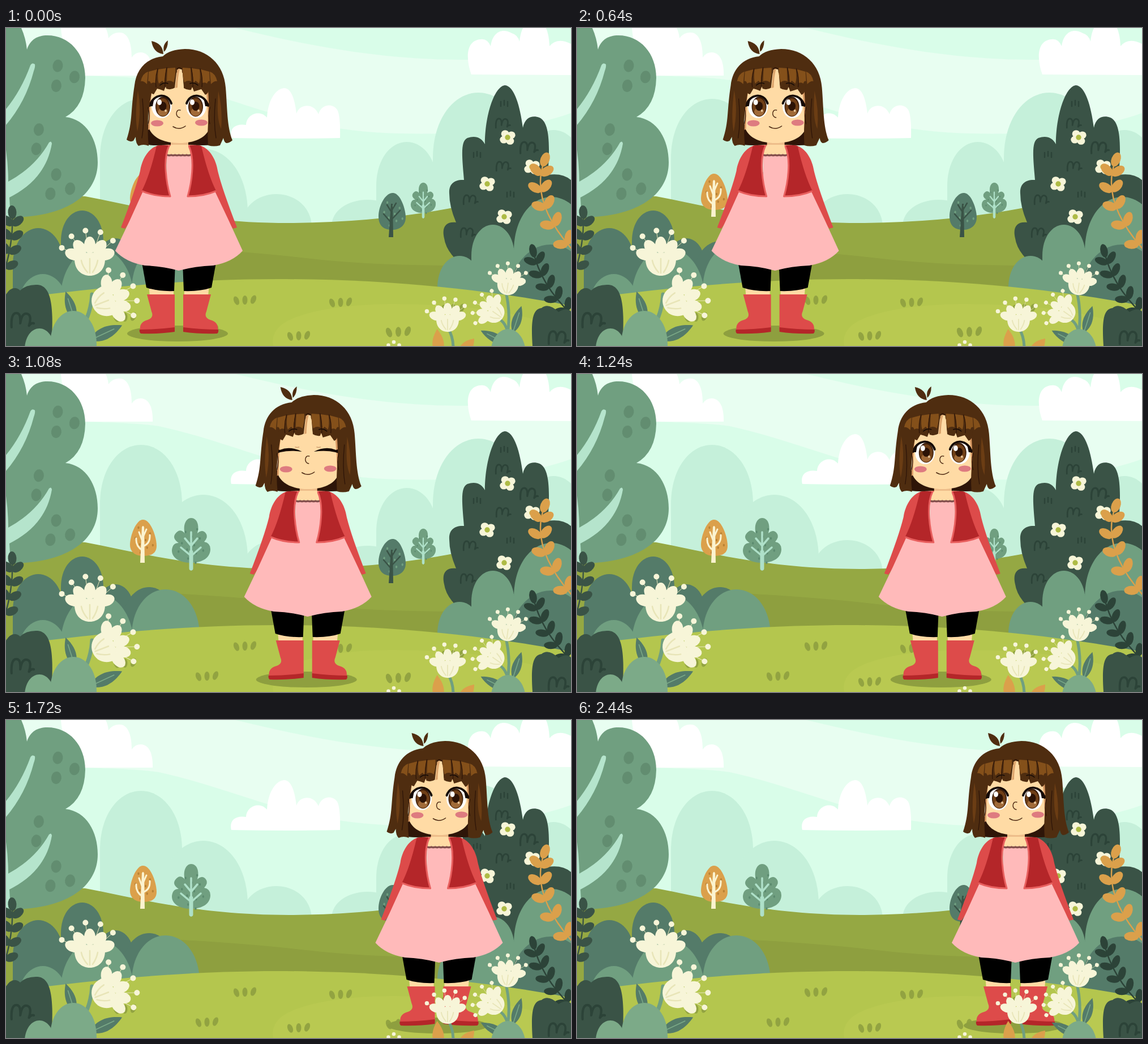
An HTML page for the animation above (2.48 s loop, 998x561 px).

```html
<!DOCTYPE html>
<html lang="en">
<head>
<meta charset="utf-8">
<title>Girl in a meadow</title>
<style>
html, body { margin: 0; height: 100%; overflow: hidden; background: #d9fde9; }
svg { display: block; width: 100vw; height: 100vh; }
</style>
</head>
<body>
<svg id="stage" viewBox="0 0 998 561" preserveAspectRatio="none"></svg>
<script>
const C = {
  sky: '#d9fde9', glow: '#e8fef1', far: '#c5f0da', sage: '#709f80', teal: '#547b69',
  pine: '#3a5346', pineLine: '#2c4338', mint: '#b5e4cc', fern: '#7caa88', orange: '#dba04b',
  cream: '#f7f5d8', creamLine: '#e8e5b8', field: '#95a843', fieldDark: '#8e9f3f',
  lawn: '#b4c64e', lawnLight: '#b9c951', grass: '#92a341',
  skin: '#ffdba5', hair: '#4f2d10', hairDark: '#2e1508', hairLight: '#84501a',
  red: '#dd4b4a', redDark: '#b42629', redLight: '#e85f5e', pink: '#ffbaba', ink: '#160b06'
};

// Drawing helpers return SVG markup
const P = (d, fill) => `<path d="${d}" fill="${fill}"/>`;
const S = (d, color, w) =>
  `<path d="${d}" fill="none" stroke="${color}" stroke-width="${w}" stroke-linecap="round" stroke-linejoin="round"/>`;
const E = (x, y, rx, ry, fill, rot = 0) =>
  `<ellipse rx="${rx}" ry="${ry}" fill="${fill}" transform="translate(${x} ${y}) rotate(${rot})"/>`;
const G = (t, s) => `<g transform="${t}">${s}</g>`;
const both = s => s + G('translate(611 0) scale(-1 1)', s);
const times = (n, f) => Array.from({ length: n }, (_, i) => f(i)).join('');

// n steps around a circle; angles in degrees clockwise from the top
const fan = (n, from, step, f) => times(n, i => {
  const a = from + i * step, r = a * Math.PI / 180;
  return f(Math.sin(r), -Math.cos(r), a);
});
// Even spread of specks in an oval, by the golden angle
const specks = (n, cx, cy, rx, ry, fill) => times(n, i => {
  const r = Math.sqrt((i + .5) / n), a = 2.4 * i;
  return E(cx + rx * r * Math.cos(a), cy + ry * r * Math.sin(a), 1.7, 2.3, fill);
});

// Rounded cap on straight sides
function dome(x0, x1, top, base, fill) {
  const w = x1 - x0, mid = x0 + w / 2, q = w * .27, side = Math.min(base, top + w * .72);
  const m = top + (side - top) * .4;
  return P(`M${x0} ${base}V${side}C${x0} ${m} ${mid - q} ${top} ${mid} ${top}S${x1} ${m} ${x1} ${side}V${base}Z`, fill);
}
const leaf = (x, y, len, w, rot, fill, vein) => G(`translate(${x} ${y}) rotate(${rot})`,
  P(`M0 0C${-w} ${-len * .3} ${-w * .8} ${-len * .65} 0 ${-len}C${w * .8} ${-len * .65} ${w} ${-len * .3} 0 0Z`, fill) +
  (vein ? S(`M0 0V${-len * .75}`, vein, 1.5) : ''));
const squiggle = (x, y, k = .9) => G(`translate(${x} ${y}) scale(${k})`,
  S('M-13 10Q-14-8-7-8Q-1-8-2 5Q0-9 7-7Q13-5 9 8Q12 4 15 5', C.pineLine, 3));
const ticks = (x, y) => S(`M${x} ${y}v8m6-10v8m6-6v8`, C.pineLine, 2.5);
const tuft = (x, y, k = 1) => G(`translate(${x} ${y}) scale(${k})`,
  times(3, i => E(15 * (i - 1), 1 - i, 4.5, 8, C.grass, 22 * (i - 1))));

const bloom = (x, y, rot, k) => G(`translate(${x} ${y}) rotate(${rot}) scale(${k})`,
  fan(5, -64, 28, (s, c) => S(`M0-25l${55 * s} ${55 * c}`, C.creamLine, 1) + E(55 * s, 55 * c - 25, 5, 5, C.cream)) +
  fan(5, -70, 35, (s, c, a) => E(31 * s, 25 * c - 29, 10, 15, C.cream, a)) +
  P('M-27-32C-28-10-14 0 0 0S28-10 27-32Q0-50-27-32Z', C.cream) +
  S('M-4-6Q-13-16-15-27M0-5V-30M5-6Q12-16 14-27', C.creamLine, 2.5));
const daisy = (x, y) => G(`translate(${x} ${y})`,
  fan(4, -33, 90, (s, c) => E(8 * s, 7.5 * c, 7, 6.5, C.cream)) + E(0, 0, 4.7, 4.7, '#aebb45'));

// Leaf pairs along a quadratic stem, ending in a tip leaf
function sprig(x0, y0, x1, y1, x2, y2, pairs, rx, ry, color) {
  return S(`M${x0} ${y0}Q${x1} ${y1} ${x2} ${y2}`, color, 2.5) + times(pairs + 1, i => {
    const t = (i + .4) / (pairs + .4), v = 1 - t;
    const x = v * v * x0 + 2 * v * t * x1 + t * t * x2, y = v * v * y0 + 2 * v * t * y1 + t * t * y2;
    const dx = v * (x1 - x0) + t * (x2 - x1), dy = v * (y1 - y0) + t * (y2 - y1);
    const up = Math.atan2(dx, -dy) * 180 / Math.PI;
    return i === pairs ? E(x, y, rx, ry, color, up)
      : fan(2, up - 50, 100, (s, c, a) => E(x + s * ry, y + c * ry, rx, ry, color, a));
  });
}

const sky =
  P('M0 0H998V561H0Z', C.sky) +
  P('M0 0H405C520 28 660 58 820 56Q930 54 998 40V150C900 185 800 188 690 186C500 180 420 125 270 92Q200 82 0 84Z', C.glow) +
  P('M97 0C100 35 110 70 125 84H259C260 55 250 43 238 43Q228 43 222 52C222 20 212 8 201 8Q189 7 181 18Q180 8 176 0Z', '#fff') +
  P('M398 194C394 178 404 168 424 171C425 152 448 143 461 158C463 125 478 106 492 106C504 107 510 125 513 151C518 134 543 131 552 152C556 136 575 131 585 144Q591 155 590 194Q500 196 398 194Z', '#fff') +
  P('M822 82C812 55 812 22 838 20Q850 18 856 32C860 5 878 0 893 9Q904 12 907 24C910-5 922-15 935-15C951-15 959 5 960 32Q974 16 998 28V83Z', '#fff') +
  dome(166, 311, 125, 345, C.far) + dome(270, 427, 213, 360, C.far) +
  dome(415, 540, 293, 352, C.far) + dome(575, 702, 303, 350, C.far) +
  dome(654, 762, 201, 350, C.far) + dome(754, 915, 114, 360, C.far) + dome(915, 1020, 180, 350, C.far);

const fields =
  P('M0 290L140 297C240 316 340 344 500 344Q660 343 800 315L998 300V561H0Z', C.field) +
  P('M240 384Q420 393 530 406T800 419V500H240Z', C.fieldDark);

const greenTree = t => G(t,
  P('M0-40C11-40 15-26 11-13Q20-21 26-13Q31-7 23 2Q34 4 34 15C34 30 20 39 0 39S-34 31-34 17Q-33 4-22 4Q-34-4-28-12Q-20-23-11-13C-15-27-9-40 0-40Z', C.sage) +
  specks(12, 0, 8, 27, 33, '#5b8b6f') +
  S('M0 51V-15M0 27L17 12M0 27L-18 12M0 9L11-4M0 9L-11-4', '#aee0c8', 3.5) + S('M0 49V20', '#aee0c8', 7));

const trees =
  P('M242 257C256 257 266 288 266 303S254 321 242 321S219 315 219 301S229 257 242 257Z', C.orange) +
  specks(9, 242, 293, 19, 27, '#b98235') +
  P('M237 333L240 270Q242 266 244 270L245 333Z', '#fbf3cf') +
  S('M241 311Q229 304 230 290M241 304Q255 300 254 284M241 295L235 279M241 290L248 274', '#fbf3cf', 3) +
  greenTree('translate(327 294)') + greenTree('translate(737 300) scale(.65 .68)') +
  P('M684 291C697 292 706 320 706 334S696 356 682 356S658 350 658 332S670 290 684 291Z', C.teal) +
  specks(9, 682, 328, 20, 25, C.sage) +
  P('M676 369L680 310H683L684 369Z', C.pine) +
  S('M680 343L667 328M681 338L696 322M681 325L673 312M681 322L689 309', C.pine, 2.5);

const pineBush =
  P('M881 101C898 102 908 138 913 176C917 156 931 154 942 158C958 165 962 195 957 259Q985 255 1000 270V430H820Q778 400 774 371C769 350 778 341 795 343Q783 315 783 292C782 276 791 267 809 268C805 222 803 200 815 194Q836 187 846 205C846 155 862 104 881 101Z', C.pine) +
  squiggle(877, 167) + squiggle(923, 210, 1.1) + squiggle(878, 243) + squiggle(820, 302) + squiggle(815, 360) +
  ticks(874, 130) + ticks(826, 220) + ticks(885, 290) +
  daisy(886, 193) + daisy(929, 245) + daisy(850, 275) + daisy(880, 333);

const bushes =
  dome(12, 102, 353, 490, C.teal) + dome(97, 172, 322, 460, C.teal) + dome(160, 226, 371, 470, C.teal) +
  dome(205, 300, 376, 460, C.teal) + dome(96, 226, 388, 495, C.sage) + dome(222, 342, 380, 462, C.sage) +
  dome(20, 110, 434, 500, C.sage) + pineBush +
  dome(897, 1030, 298, 480, C.sage) + dome(762, 840, 402, 480, C.sage) + dome(822, 898, 347, 500, C.sage) +
  dome(884, 1040, 382, 500, C.teal);

const lawn =
  P('M0 479C180 455 330 443 480 443C680 443 850 462 998 490V561H0Z', C.lawn) +
  P('M472 561Q466 530 505 513C560 490 650 483 760 489Q900 496 998 535V561Z', C.lawnLight) +
  tuft(422, 480) + tuft(591, 484) + tuft(355, 533) + tuft(517, 543) + tuft(693, 536, 1.1) + tuft(210, 510) + tuft(790, 495);

const spots = (x, y, n, from) => fan(n, from, 118, (s, c) => E(x + 21 * s, y + 20 * c, 9, 11, '#628d70', 8));
const bigTree =
  P('M0 0H27Q35 18 37 38C43 20 56 13 73 13C112 13 140 45 140 88Q139 138 105 157C142 161 162 197 162 237C162 295 105 336 0 334Z', C.sage) +
  P('M43 66Q46 60 51 64Q52 68 49 76Q35 130 0 171V143Q27 110 43 66Z', C.mint) +
  P('M0 215Q4 245 4 271Q52 245 76 202Q80 198 81 204C73 252 42 281 6 299L8 334H0Z', C.mint) +
  spots(100, 85, 3, -24) + spots(45, 195, 2, 38) + spots(93, 278, 3, -12);

const leftPlants =
  sprig(-4, 434, 14, 375, 11, 325, 4, 7.5, 12, C.pine) +
  S('M152 470Q150 500 138 522', C.sage, 7) +
  bloom(148, 437, 0, 1) + bloom(153, 491, 69, 1) +
  P('M0 470Q12 452 25 463Q36 452 56 453C80 455 85 490 80 561H0Z', C.pine) + squiggle(28, 514, 1.4) +
  leaf(122, 516, 54, 13, -18, C.teal, C.fern) + leaf(148, 551, 63, 16, 65, C.teal, C.fern) +
  dome(78, 160, 499, 585, C.fern) + dome(33, 85, 530, 590, C.fern);

const rightPlants =
  sprig(1004, 395, 922, 305, 952, 232, 5, 8, 13, C.orange) +
  sprig(1000, 506, 945, 455, 931, 393, 5, 6.5, 12, C.pineLine) +
  P('M930 561C927 515 930 496 946 494Q958 484 976 501Q990 492 998 500V561Z', C.pine) + squiggle(975, 545, 1.25) +
  S('M882 462Q892 500 886 540M868 512Q884 518 888 545M781 530Q790 545 790 565', C.sage, 5) +
  bloom(884, 471, 8, .7) + bloom(877, 512, -55, .7) + bloom(780, 536, 0, .74) +
  leaf(895, 538, 50, 12, 18, C.teal, C.fern) + leaf(884, 557, 51, 12, -63, C.teal, C.fern) +
  dome(856, 918, 531, 590, C.fern) +
  leaf(765, 580, 49, 15, -4, C.orange) + leaf(800, 580, 42, 15, 40, C.orange) +
  fan(3, -60, 60, (s, c) => E(685 + 11 * s, 565 + 11 * c, 3.3, 3.3, C.cream));

const legs = both(
  P('M252 450L296 455V474H254Z', C.skin) +
  P('M240 414H299L297 464Q268 465 248 458Z', '#000') +
  P('M249 470H298V533H237Q235 519 250 515Q262 511 257 500Z', C.red) +
  P('M236 532Q266 532 298 528V536Q270 540 238 539Q235 537 236 532Z', C.redDark));

const body =
  P('M283 200H330V228H283Z', C.skin) +
  both(P('M275 206C252 208 240 232 237 252Q230 282 203 352L210 354L250 300L285 215Z', C.red)) +
  P('M284 223H327L330 288H369Q394 340 418 393Q400 413 366 419Q335 420 305 428Q276 420 245 419Q211 413 193 393Q219 340 242 288H284Z', C.pink) +
  S('M285 224' + 'q3.4 1.5 6.8 0'.repeat(6), '#84504d', 3.5) +
  both(P('M266 208Q275 205 289 207Q281 220 282 245T290 298Q262 298 240 287Q254 260 266 208Z', C.redDark) +
    S('M288 208Q281 223 282 248T290 297Q262 297 241 288', C.redLight, 3)) +
  S('M289 207H322', C.red, 1.5);

const iris = x =>
  E(x, 139, 13, 17.5, '#3a1c09') + E(x, 140, 11.5, 16, '#6f3f17') + E(x, 148, 8.5, 7, '#a06a38') +
  E(x, 138, 6.5, 8, '#2c1306') + E(x - 6, 131, 4, 5, '#fff') + E(x + 5, 146, 1.8, 2, '#e8c9a0');
const openEye = both(
  E(275, 139, 17.5, 20, '#fff') +
  S('M254 137C260 116 285 113 292 133', C.ink, 4) +
  P('M249 132L255 134Q257 128 262 123L259 138L252 138Z', C.ink)) + iris(277) + iris(335);
const shutEye = both(
  P('M249 132L256 134Q274 126 295 137Q274 134 257 138L251 140Z', C.ink) +
  S('M283 129Q287 130 290 129', '#b98255', 1));

const head =
  P('M246 170H365V206Q346 208 330 206H283Q266 208 250 206Z', C.hairDark) +
  P('M291 188H322V208H291Z', '#edbd8a') + P('M291 206H322V216H291Z', C.skin) +
  P('M253 70H359V178C352 194 333 203 306 203S260 194 253 178Z', C.skin) +
  both(P('M253 105L258 107Q254 140 254 178L251 180Z', '#d99a63')) +
  E(267, 168, 11, 5.5, '#de7b80') + E(345, 167, 11, 5.5, '#de7b80') +
  S('M308 145C300 142 298 157 307 158', '#4c2812', 1.4) +
  S('M295 174Q306 181 317 173', '#4c2812', 1.5) +
  `<g id="open">${openEye}</g><g id="shut">${shutEye}</g>` +
  // Crown and side locks, then the fringe
  P('M277 50C247 53 230 74 227 101C220 145 224 165 213 197Q219 202 225 199L229 192Q229 203 234 208Q243 204 252 208Q249 180 252 145L258 108L305 72Q345 78 357 108L359 148Q355 180 357 207Q367 210 378 207L384 194Q385 201 389 203Q395 203 400 198C390 174 391 140 388 105C385 64 356 37 316 37Q289 38 277 50Z', C.hair) +
  P('M256 85L303 68L299 105Q291 110 283 107L282 103L279 111Q272 108 267 107L261 117Q254 116 253 105Z', C.hair) +
  P('M310 68L356 85L359 105Q358 116 352 118L345 108L332 112L329 104L327 109Q320 110 314 106Z', C.hair) +
  P('M301 80Q306 70 312 80L314 106Q306 101 298 106Z', C.skin) +
  P('M299 106Q302 80 302 74L307 72Q303 88 303 105Z', '#dca46c') +
  both(P('M238 94Q241 80 251 77L249 99Q243 93 238 94ZM252 77L267 73L264 97Q259 95 256 98Q254 92 251 94ZM269 73L283 71Q281 84 280 97L276 93L270 98Q267 90 269 73ZM285 71L299 70Q300 82 296 96Q291 91 284 94Z', C.hairLight) +
    S('M268 72Q263 88 265 104M284 70Q280 88 281 104M241 125Q245 165 240 194M251 140Q255 155 251 169', C.hairDark, 1.3) +
    S('M272 101Q279 95 286 98', C.ink, 1.5)) +
  S('M302 72Q306 68 310 72', C.hairDark, 1.4) +
  P('M233 110Q240 145 232 183Q227 155 233 110ZM375 111Q383 145 380 178Q371 160 375 111Z', '#6b3d14') +
  P('M257 23Q277 27 278 46Q260 44 257 23ZM286 22Q276 29 279 42Q286 36 286 22Z', C.hair);

const girl = `<g id="girl">${E(303, 539, 89, 14, C.fieldDark)}${legs}${body}${head}</g>`;

const stage = document.getElementById('stage');
stage.innerHTML = sky + fields + trees + bushes + lawn + bigTree + leftPlants + girl + rightPlants;
const [girlEl, openEl, shutEl] = ['girl', 'open', 'shut'].map(id => document.getElementById(id));

const LOOP = 2480, GLIDE = 2000, REACH = 469, BLINKS = [800, 2000];

// Cubic Bézier ease with handles (.75, 0) and (.37, 1)
function ease(x) {
  let lo = 0, hi = 1;
  for (let i = 0; i < 24; i++) {
    const s = (lo + hi) / 2, v = 1 - s;
    if (3 * s * v * v * .75 + 3 * s * s * v * .37 + s * s * s < x) lo = s; else hi = s;
  }
  return lo * lo * (3 - 2 * lo);
}

// Quick close, a hold, then a slower opening in steps
function openness(t) {
  const d = t - BLINKS.findLast(b => b <= t);
  if (!(d < 440)) return 1;
  if (d < 40) return .5;
  return d < 320 ? 0 : d < 400 ? .35 : .7;
}

function draw(t) {
  const o = openness(t), x = REACH * ease(Math.min(t / GLIDE, 1));
  girlEl.setAttribute('transform', `translate(${x.toFixed(2)} 0)`);
  openEl.setAttribute('transform', `translate(0 ${137 * (1 - o)}) scale(1 ${o})`);
  openEl.setAttribute('visibility', o ? 'visible' : 'hidden');
  shutEl.setAttribute('visibility', o ? 'hidden' : 'visible');
}
const start = performance.now();
function tick() {
  draw((performance.now() - start) % LOOP);
  requestAnimationFrame(tick);
}
tick();
</script>
</body>
</html>
```
